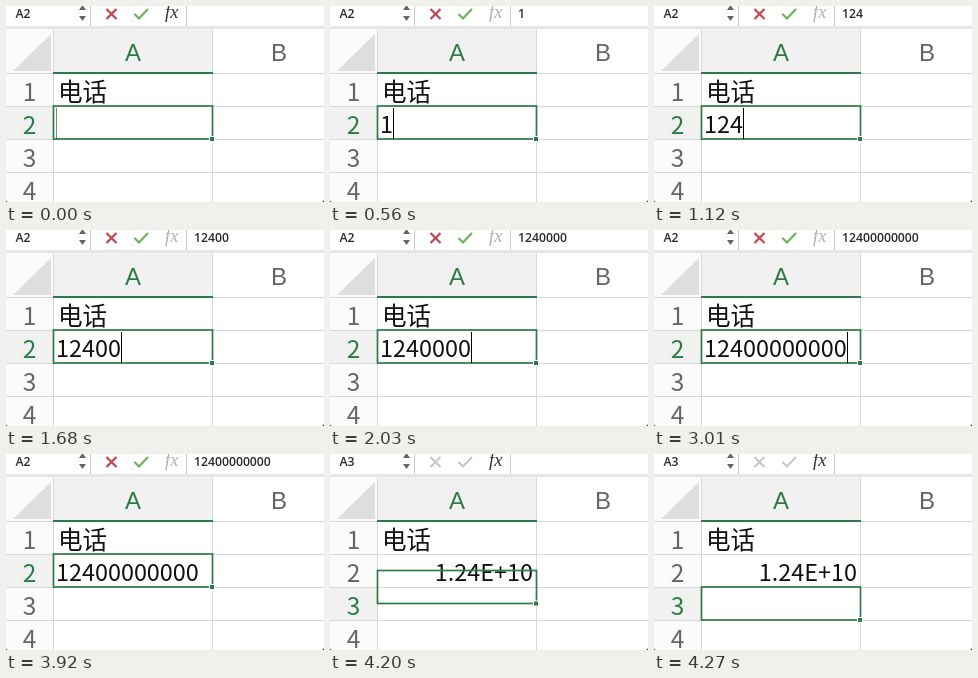
Write an HTML page that moves like this. It is 318 px wide and 196 px high and loops after 5.18 s.

```html
<!DOCTYPE html>
<html lang="zh">
<head>
<meta charset="utf-8">
<style>
  html, body { margin: 0; width: 100%; height: 100%; overflow: hidden; background: #333; }
  svg { display: block; width: 318px; height: 196px; background: #fff; border-radius: 0 0 3px 3px; }
  text { font-family: "Noto Sans CJK SC", "Noto Sans CJK", "Noto Sans", sans-serif; }
  .column { font: 24px "Liberation Sans", Arial, sans-serif; text-anchor: middle; }
  .row { font-size: 24.5px; text-anchor: middle; fill: #666; }
  .active { fill: #2b7d47; }
  .cell { font-size: 23.4px; fill: #111; }
  .bar { font: 600 12.24px "Open Sans", "Noto Sans", sans-serif; fill: #2c2c2c; }
  .grid { stroke: #d8d8d8; fill: none; }
  .icon { stroke-width: 2.2; fill: none; }
</style>
</head>
<body>
<svg viewBox="0 0 318 196">
  <!-- formula bar -->
  <rect y="20" width="318" height="3" fill="#e6e6e6"/>
  <path d="M84.5 0V20M180.5 0V20" stroke="#d0d0d0"/>
  <text id="address" class="bar" x="9.500" y="12"></text>
  <path d="M73 4L76.5 -1L80 4ZM73 10L76.5 15L80 10Z" fill="#666"/>
  <path id="cancel" class="icon" d="M100.500 3L110.500 13M110.500 3L100.500 13"/>
  <path id="accept" class="icon" d="M128.500 8L133 12.500L142 3"/>
  <text id="fx" x="159" y="12" style="font:italic 18.5px 'Liberation Serif',serif">fx</text>
  <text id="formula" class="bar" x="188" y="12"></text>

  <!-- headers and grid -->
  <rect y="23" width="47" height="173" fill="#fbfbfb"/>
  <rect x="48" y="23" width="159" height="44" fill="#f1f1f1"/>
  <rect id="rowShade" width="47" height="33" fill="#f1f1f1"/>
  <path d="M7 65H45V28Z" fill="#dedede"/>
  <path class="grid" d="M0 67.500H318M0 100.500H318M0 133.500H318M0 166.500H318M47.500 23V196M206.500 23V196"/>
  <path d="M47 67H207" stroke="#2b7d47" stroke-width="2"/>
  <text class="column active" x="127" y="55">A</text>
  <text class="column" x="273" y="55" fill="#666">B</text>
  <g id="rows"></g>

  <!-- cells -->
  <text class="cell" x="52" y="94.500" style="font-size:24.5px">电话</text>
  <text id="value" class="cell" y="127"></text>
  <g id="selection">
    <rect x="47.500" width="159" height="33" fill="none" stroke="#2b7d47" stroke-width="1.700"/>
    <rect x="203.500" y="30.500" width="5" height="5" fill="#2b7d47" stroke="#fff"/>
  </g>
  <rect id="caret" y="102" width="1" height="31" fill="#000"/>
</svg>
<script>
const LOOP = 5180, STEP = 70, COMMIT = 4200;
const NUMBER = "12400000000", SHORT = "1.24E+10";
const KEYS = [560, 770, 1120, 1470, 1680, 1890, 2030, 2450, 2590, 2800, 3010];
const $ = id => document.getElementById(id);

const rows = [1, 2, 3, 4].map(n => {
  const label = document.createElementNS("http://www.w3.org/2000/svg", "text");
  label.textContent = n;
  label.setAttribute("x", 23.5);
  label.setAttribute("y", 61.5 + 33 * n);
  return $("rows").appendChild(label);
});

// Caret fades out in four equal steps
const fade = (t, start) =>
  t < start ? 1 : Math.max(0, 1 - (Math.floor((t - start) / STEP) + 1) / 4);

function draw(t) {
  const typed = KEYS.filter(k => k <= t).length;
  const done = t >= COMMIT;
  const row = done ? 3 : 2;
  const text = NUMBER.slice(0, typed);

  $("address").textContent = "A" + row;
  $("formula").textContent = done ? "" : text;
  $("fx").setAttribute("fill", typed && !done ? "#b0b0b0" : "#333");
  $("cancel").setAttribute("stroke", done ? "#c8c8c8" : "#c0454f");
  $("accept").setAttribute("stroke", done ? "#c8c8c8" : "#6cb452");

  $("value").textContent = done ? SHORT : text;
  $("value").setAttribute("x", done ? 203 : 50);
  $("value").setAttribute("text-anchor", done ? "end" : "start");

  const top = !done ? 100 : t < COMMIT + STEP ? 116.5 : 133;
  $("selection").setAttribute("transform", `translate(0 ${top})`);
  $("rowShade").setAttribute("y", 34 + 33 * row);
  rows.forEach((label, i) =>
    label.setAttribute("class", i + 1 === row ? "row active" : "row"));

  $("caret").setAttribute("x", 50 + 13 * typed);
  $("caret").setAttribute("opacity", done ? 0 : fade(t, typed ? 3710 : -STEP));
}

const start = performance.now();
function tick() {
  draw((performance.now() - start) % LOOP);
  requestAnimationFrame(tick);
}
tick();
</script>
</body>
</html>
```
